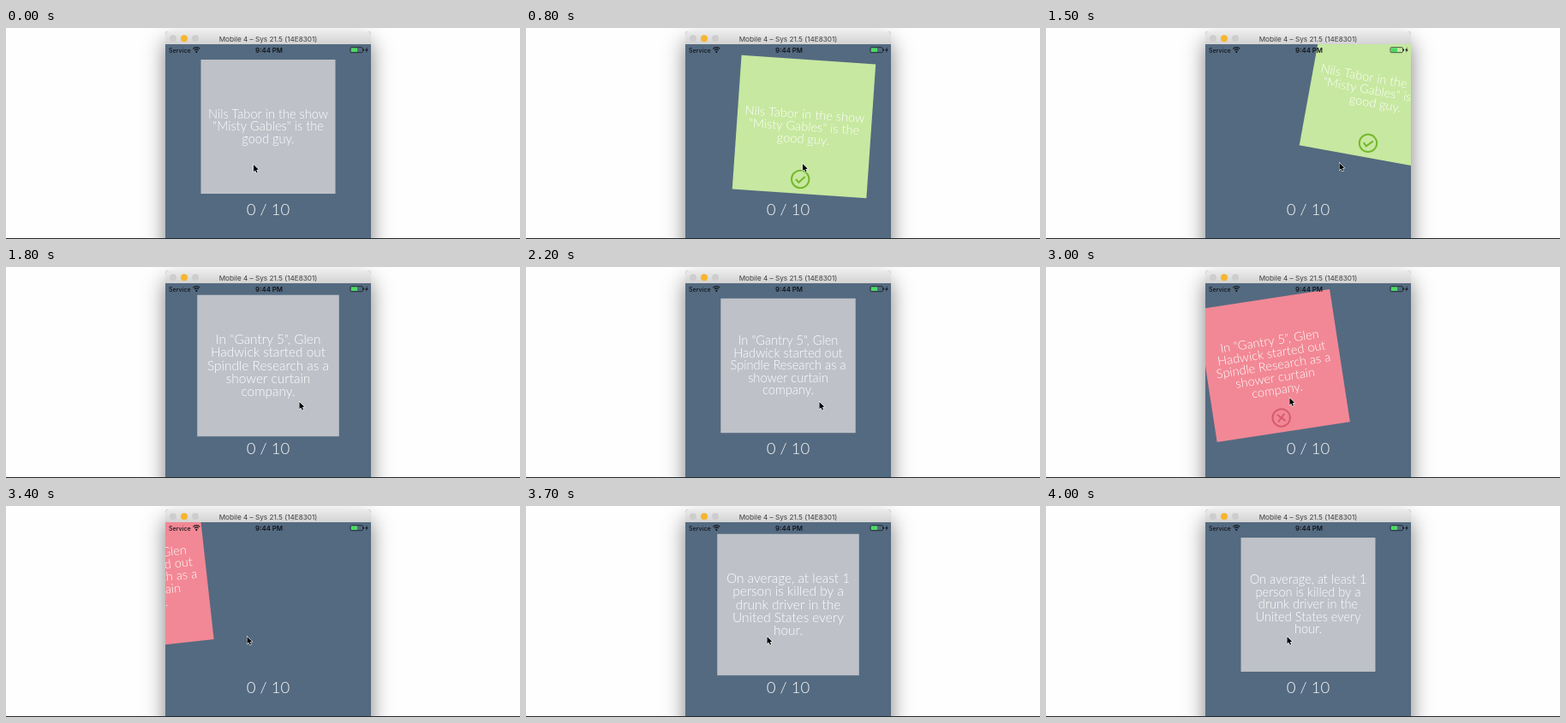
Recreate the animation shown at these times as an HTML page with a canvas. Size 600x247 px, loop 4600 ms.

```html
<!DOCTYPE html>
<html lang="en">
<head>
<meta charset="utf-8">
<title>Swipe quiz</title>
<style>
  html, body { margin: 0; width: 100%; height: 100%; overflow: hidden; background: #fefefe; }
  canvas { display: block; }
</style>
</head>
<body>
<canvas id="stage" width="600" height="247"></canvas>
<script>
const ctx = document.getElementById("stage").getContext("2d");
const LOOP = 4600, STEP = 100;
const CARD = 157, HOME = { x: 306, y: 115.5 };
const WINDOW = { x: 186, y: 4, w: 240, h: 330, bar: 15 };
const DRAG = { time: 510, slop: 13, reach: 48, tilt: 10.3 };

// rest: pointer before the swipe; fly and turn: change per 100 ms after release.
const cards = [
  {
    born: -2000, swipe: 690, release: 1300, gone: 1700, dir: 1, verdict: "right",
    rest: { x: 289, y: 160 }, fly: { x: 16.5, y: -20.7 }, turn: 0,
    text: ["Nils Tabor in the show", "\"Misty Gables\" is the", "good guy."]
  },
  {
    born: 1700, swipe: 2690, release: 3200, gone: 3600, dir: -1, verdict: "wrong",
    rest: { x: 342.5, y: 158 }, fly: { x: -51, y: -14.5 }, turn: 2,
    text: ["In \"Gantry 5\", Glen", "Hadwick started out", "Spindle Research as a", "shower curtain", "company."]
  },
  {
    born: 3600, swipe: Infinity, release: Infinity, gone: LOOP,
    rest: { x: 281.5, y: 153 },
    text: ["On average, at least 1", "person is killed by a", "drunk driver in the", "United States every", "hour."]
  }
];

const looks = {
  idle: { fill: "#bec1c8" },
  right: { fill: "#c7e8a0", ink: "#76b82c" },
  wrong: { fill: "#f28895", ink: "#d65c6c" }
};

const lerp = (a, b, k) => a + (b - a) * k;
const easeOut = (k, power) => 1 - (1 - k) ** power;
const dragProgress = (card, t) => Math.min(1, Math.max(0, (t - card.swipe) / DRAG.time));

function popScale(age) {
  const u = age / 100;
  return 1 - 0.4 * Math.exp(-u) * Math.cos(1.95 * u);
}

function poseOf(card, t) {
  const pose = { ...HOME, angle: 0, scale: popScale(t - card.born) };
  if (t < card.swipe) return pose;
  const pull = card.dir * easeOut(dragProgress(card, t), 2);
  const flown = Math.max(0, t - card.release) / 100;
  pose.x += pull * DRAG.reach + card.fly.x * flown;
  pose.y += card.fly.y * flown;
  pose.angle = pull * DRAG.tilt + card.turn * flown;
  return pose;
}

function pointerAt(card, next, t) {
  if (t < card.swipe) return card.rest;
  const k = easeOut(dragProgress(card, t), 3);
  return {
    x: lerp(card.rest.x + card.dir * DRAG.slop, next.rest.x, k),
    y: lerp(card.rest.y, next.rest.y, k)
  };
}

function write(text, x, y, font, color, align = "center") {
  ctx.font = font;
  ctx.fillStyle = color;
  ctx.textAlign = align;
  ctx.fillText(text, x, y);
}

function disc(x, y, r, color) {
  ctx.fillStyle = color;
  ctx.beginPath();
  ctx.arc(x, y, r, 0, Math.PI * 2);
  ctx.fill();
}

function trace(points, closed) {
  ctx.beginPath();
  points.forEach(([x, y]) => ctx.lineTo(x, y));
  if (closed) ctx.closePath();
}

function drawWindow() {
  const { x, y, w, h, bar } = WINDOW;
  ctx.save();
  ctx.shadowColor = "rgba(0,0,0,0.5)";
  ctx.shadowBlur = 25;
  ctx.shadowOffsetY = 12;
  ctx.fillStyle = "#546a80";
  ctx.beginPath();
  ctx.roundRect(x, y, w, h, 4);
  ctx.fill();
  ctx.restore();

  const shade = ctx.createLinearGradient(0, y, 0, y + bar);
  shade.addColorStop(0, "#ebebeb");
  shade.addColorStop(1, "#d3d3d3");
  ctx.fillStyle = shade;
  ctx.beginPath();
  ctx.roundRect(x, y, w, bar, [4, 4, 0, 0]);
  ctx.fill();
  ["#cdcdcd", "#f6b52f", "#cdcdcd"].forEach((color, i) => disc(195 + 13 * i, 12.3, 4, color));
  write("Mobile 4 – Sys 21.5 (14E8301)", HOME.x, 15.5, "8.2px Inter, sans-serif", "#3c3c3c");
}

function drawStatus() {
  const ink = "#10151b";
  write("Service", 190, 28.5, "500 7.1px Inter, sans-serif", ink, "left");
  write("9:44 PM", 307, 28.5, "600 7.8px Inter, sans-serif", ink);

  ctx.strokeStyle = ink;
  ctx.lineWidth = 1.3;
  for (const r of [3.2, 5.6]) {
    ctx.beginPath();
    ctx.arc(222.3, 28.3, r, -Math.PI * 0.75, -Math.PI * 0.25);
    ctx.stroke();
  }
  disc(222.3, 27.9, 1.1, ink);

  ctx.lineWidth = 0.7;
  ctx.beginPath();
  ctx.roundRect(402, 22.7, 14.5, 6, 1.2);
  ctx.stroke();
  ctx.fillStyle = "#4cd964";
  ctx.fillRect(402.8, 23.4, 7.2, 4.6);
  ctx.fillStyle = ink;
  ctx.fillRect(417, 24.7, 1, 2);
  trace([[421.7, 22.5], [419.2, 26.2], [420.8, 26.2], [420.2, 29], [422.8, 25.2], [421.2, 25.2]], true);
  ctx.fill();
}

function drawVerdict(verdict, ink) {
  ctx.strokeStyle = ink;
  ctx.lineWidth = 2;
  ctx.beginPath();
  ctx.arc(0, 61.7, 10.2, 0, Math.PI * 2);
  ctx.stroke();
  if (verdict === "right") {
    trace([[-5.2, 62], [-1.6, 65.6], [5.4, 58.2]]);
    ctx.stroke();
  } else {
    for (const side of [-1, 1]) {
      trace([[-4.4 * side, 57.3], [4.4 * side, 66.1]]);
      ctx.stroke();
    }
  }
}

function drawCard(card, t) {
  const swiping = t >= card.swipe;
  const look = looks[swiping ? card.verdict : "idle"];
  const { x, y, angle, scale } = poseOf(card, t);
  ctx.save();
  ctx.beginPath();
  ctx.rect(WINDOW.x, WINDOW.y + WINDOW.bar, WINDOW.w, WINDOW.h);
  ctx.clip();
  ctx.translate(x, y);
  ctx.rotate(angle * Math.PI / 180);
  ctx.scale(scale, scale);
  ctx.fillStyle = look.fill;
  ctx.fillRect(-CARD / 2, -CARD / 2, CARD, CARD);
  const middle = (card.text.length - 1) / 2;
  card.text.forEach((line, i) => write(line, 0, (i - middle) * 14.5 + 4.8, "300 14.6px Lato, sans-serif", "#fff"));
  if (swiping) drawVerdict(card.verdict, look.ink);
  ctx.restore();
}

function drawPointer({ x, y }) {
  ctx.save();
  ctx.translate(x, y);
  ctx.scale(0.85, 0.85);
  trace([[0, 0], [0, 9.6], [2.2, 7.6], [3.8, 11.2], [5.4, 10.5], [3.9, 7], [6.8, 6.8]], true);
  ctx.strokeStyle = "#fff";
  ctx.lineWidth = 1.2;
  ctx.stroke();
  ctx.fillStyle = "#000";
  ctx.fill();
  ctx.restore();
}

function render(now) {
  const t = Math.floor((now % LOOP) / STEP) * STEP;
  const index = cards.findIndex(card => t < card.gone);
  const card = cards[index];
  ctx.fillStyle = "#fefefe";
  ctx.fillRect(0, 0, 600, 247);
  drawWindow();
  write("0 / 10", HOME.x, 219, "300 18.5px Lato, sans-serif", "#fff");
  drawCard(card, t);
  drawStatus();
  drawPointer(pointerAt(card, cards[index + 1], t));
  ctx.fillStyle = "#22282d";
  ctx.fillRect(0, 246, 600, 1);
}

const start = performance.now();
function tick() {
  render(performance.now() - start);
  requestAnimationFrame(tick);
}
tick();
</script>
</body>
</html>
```
